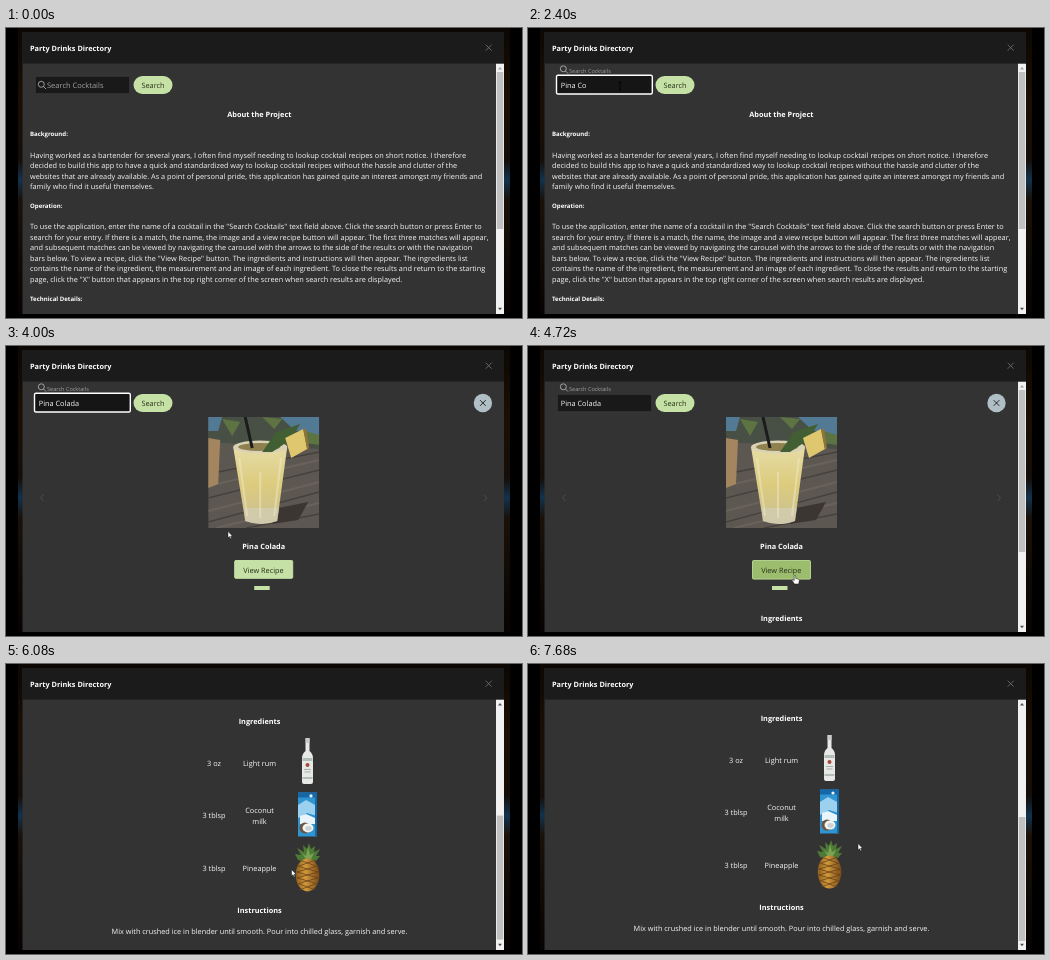
An HTML page that plays this animation: 516x290 px, repeating every 7760 ms.

```html
<!DOCTYPE html>
<html lang="en">
<head>
<meta charset="utf-8">
<title>Party Drinks Directory</title>
<style>
  html, body { margin: 0; width: 100%; height: 100%; overflow: hidden; background: #000; }
  svg { display: block; }
  text { font: 7.32px "Open Sans", "Noto Sans", sans-serif; fill: #f6f6f6; text-rendering: geometricPrecision; white-space: pre; }
  .bold { font-weight: 700; fill: #fff; }
  .small { font-size: 6.06px; }
  .mid { text-anchor: middle; }
  .dark { fill: #263018; }
  .line { fill: none; stroke: #555; stroke-width: .8; }
</style>
</head>
<body>
<svg width="516" height="290" viewBox="0 0 516 290">
  <defs>
    <linearGradient id="space" x2="0" y2="1">
      <stop offset="0" stop-color="#0c0703"/>
      <stop offset=".25" stop-color="#1a0f05"/>
      <stop offset=".46" stop-color="#140d08"/>
      <stop offset=".53" stop-color="#12324c"/>
      <stop offset=".6" stop-color="#1a1109"/>
      <stop offset="1" stop-color="#060302"/>
    </linearGradient>
    <linearGradient id="drink" x2="0" y2="1">
      <stop offset="0" stop-color="#e6dca4"/>
      <stop offset=".5" stop-color="#dccb7e"/>
      <stop offset="1" stop-color="#c9bf94"/>
    </linearGradient>
    <linearGradient id="gold">
      <stop offset="0" stop-color="#8a5a1c"/>
      <stop offset=".4" stop-color="#d29a3c"/>
      <stop offset="1" stop-color="#7a4a18"/>
    </linearGradient>
    <clipPath id="body"><path d="M16 35.5H498V286H16z"/></clipPath>
    <clipPath id="frame"><path d="M198 71H309V182H198z"/></clipPath>
  </defs>

  <path fill="url(#space)" d="M12 0H504V286H12z"/>
  <path fill="#333" d="M16.5 4H498V286H16.5z"/>
  <path fill="#1b1b1b" d="M16.5 4H498V35.5H16.5z"/>
  <text class="bold" x="24" y="23">Party Drinks Directory</text>
  <path class="line" style="stroke:#777" d="M479.7 16.7l6 6m0-6l-6 6"/>

  <g clip-path="url(#body)">
    <g id="page">
      <rect id="field"/>
      <g id="icon" class="line" style="stroke:#bbb"><circle cx="35.300" cy="56.300" r="3"/><path d="M37.500 58.500l2.600 2.600"/></g>
      <text id="label" x="41" style="fill:#a2a2a2">Search Cocktails</text>
      <text id="typed" x="32.800" y="60.200"></text>
      <rect x="127.500" y="48" width="39" height="18" rx="9" fill="#c5e1a5"/>
      <text class="mid dark" x="147" y="60.200">Search</text>

      <g id="about"></g>

      <g id="results">
        <g id="close"><circle cx="468.500" cy="57" r="9.200" fill="#b0bec5"/><path d="M465.700 54.200l5.600 5.600m0-5.600l-5.600 5.600" stroke="#222"/></g>
        <path id="prev" class="line" d="M37.500 148.500l-3 3.300l3 3.300"/>
        <path id="next" class="line" d="M469.500 148.500l3 3.300l-3 3.300"/>
        <g id="column">
          <g id="photo" clip-path="url(#frame)">
            <path fill="#5d5752" d="M198 71H309V182H198z"/>
            <path fill="#485046" d="M198 71H309V103L198 96z"/>
            <path fill="#527a94" d="M270 71H309V90L284 84zM198 71h14l-4 14h-10z"/>
            <path fill="#5d7442" d="M212 73l18 3-8 14zM252 71l20 2-8 10zM292 84l17 5v10l-14-2z"/>
            <path stroke="#45403c" stroke-width="1.300" d="M198 128L309 106M198 152L309 124M198 176L309 146M236 182L309 168"/>
            <path stroke="#69625c" stroke-width="2" d="M198 140L309 114M198 165L309 136M206 182L309 157"/>
            <path fill="#a3865f" d="M198 92l12 2-2 44-10 4z"/>
            <path fill="#3b3632" d="M268 162l30-6-10 18-26 4z"/>
            <path fill="url(#drink)" d="M223 101h54l-10 74q-16 6-32 0z"/>
            <path fill="#d6d2c2" opacity=".55" d="M234 162h35l-2 13q-16 6-32 0z"/>
            <path stroke="#f3edd0" opacity=".45" stroke-width="2" d="M229 112l8 58M271 112l-7 58M250 126v46"/>
            <ellipse cx="250" cy="101" rx="27" ry="6.500" fill="#d9d2b4"/>
            <ellipse cx="249" cy="101" rx="21" ry="4" fill="#8f8050"/>
            <path fill="#425f34" d="M252 106l14-20 24-8-10 16-18 12z"/>
            <path fill="#dfc76f" d="M275 92l18-9 4 20-16 9z"/>
            <path fill="#8f7438" d="M293 83l3 0 3 19-2 2z"/>
            <path stroke="#1b1b1b" stroke-width="3" d="M235 71l7 31"/>
          </g>
          <g id="details">
            <text class="mid bold" x="253.500" y="203.100">Pina Colada</text>
            <rect id="view" x="224.500" width="58" rx="1"/>
            <text class="mid dark" x="253.300" y="227">View Recipe</text>
            <path fill="#c5e1a5" d="M244 240h15.500v4H244z"/>
          </g>
        </g>
        <g id="recipe">
          <g id="bottle">
            <path fill="#c9ccca" d="M299.300 289h4.500v5h-4.500z"/>
            <path fill="#e6e9e6" d="M299.500 294h4v8q3.500 3 3.500 7v24q0 2-2 2h-7q-2 0-2-2v-24q0-4 3.500-7z"/>
            <path fill="#b3bdb7" d="M296.500 309h10v3h-10zM296.500 328h10v2h-10z"/>
            <circle cx="301.500" cy="316" r="2" fill="#a8473c"/>
            <path stroke="#8c928e" stroke-width=".7" d="M298 320.500h7M298.500 323h6"/>
          </g>
          <g id="carton">
            <path fill="#2f94d0" d="M292 343.500h19v44h-19z"/>
            <path fill="#9bd0ee" d="M292 356l8-5 11 6v10l-10-3-9 5z"/>
            <path fill="#1667a7" d="M292 343.500h19v5h-19zM309 348h2v39h-2z"/>
            <circle cx="305" cy="347" r="1.600" fill="#e9f3f8"/>
            <path fill="#eaf5fb" d="M294 367l6-2 9 4v6h-15z"/>
            <circle cx="299" cy="379" r="5.500" fill="#6b5444"/>
            <ellipse cx="302" cy="379" rx="5.500" ry="4.500" fill="#f5f5f0"/>
            <ellipse cx="302.500" cy="379.500" rx="3.200" ry="2.400" fill="#c9d3d6"/>
          </g>
          <g id="pineapple">
            <path fill="#4d7a35" d="M301 414l-9-3-3-6 6 1-4-7 7 4-1-7 4 4 2-6 2 6 4-3-1 6 6-3-4 7 4 0-4 5z"/>
            <path fill="#7ba354" d="M301 412l-5-8 4 3 2-9 2 8 4-2-4 8z"/>
            <ellipse cx="301.500" cy="426" rx="11.800" ry="16.500" fill="url(#gold)"/>
            <path id="hatch" fill="none" stroke="#6a4217" stroke-width=".8"/>
          </g>
        </g>
      </g>
    </g>
    <g id="scrollbar">
      <path fill="#f1f1f1" d="M490 35.500h8V286h-8z"/>
      <path id="up" d="M492 41.500l2-2.500 2 2.500z"/>
      <path fill="#505050" d="M492 279.800h4l-2 2.500z"/>
      <rect id="thumb" x="490.800" width="6.400" fill="#c1c1c1"/>
    </g>
  </g>

  <g id="cursor">
    <path id="beam" fill="none" stroke="#000" stroke-width=".8" d="M-1.500-4h3m-1.500 0v8m-1.500 0h3"/>
    <path id="arrow" fill="#fff" stroke="#111" stroke-width=".5" d="M0 0v6.500l1.500-1.300 1 2.300 1.100-.5-1-2.200h2z"/>
    <path id="hand" fill="#fff" stroke="#111" stroke-width=".5" d="M-.8 0q.8-.8 1.500 0v3l3 .8q.7.300.6 1.200l-.6 3.500h-4.200l-2.500-3.700q.2-1 1.200-.5l1 .8z"/>
  </g>
</svg>

<script>
const LOOP = 7760, FOCUS = 800, RESULTS = 3280, IMAGE = 3360, OPEN = 4400, LOADED = 4880;
const $ = id => document.getElementById(id);
const set = (id, attrs) => { for (const k in attrs) $(id).setAttribute(k, attrs[k]); };
const show = (id, on) => { $(id).style.display = on ? '' : 'none'; };
const move = (id, x, y) => set(id, { transform: `translate(${x} ${y})` });

function write(parent, x, y, string, cls = '') {
  const node = document.createElementNS('http://www.w3.org/2000/svg', 'text');
  node.setAttribute('x', x);
  node.setAttribute('y', y);
  node.setAttribute('class', cls);
  node.textContent = string;
  $(parent).append(node);
}
const paragraph = (y, lines) => lines.forEach((line, i) => write('about', 24, y + i * 10.45, line));

write('about', 253.3, 89.2, 'About the Project', 'bold mid');
write('about', 24, 108.2, 'Background:', 'bold small');
paragraph(129.6, [
  'Having worked as a bartender for several years, I often find myself needing to lookup cocktail recipes on short notice. I therefore',
  'decided to build this app to have a quick and standardized way to lookup cocktail recipes without the hassle and clutter of the',
  'websites that are already available. As a point of personal pride, this application has gained quite an interest amongst my friends and',
  'family who find it useful themselves.'
]);
write('about', 24, 180.2, 'Operation:', 'bold small');
paragraph(201.4, [
  'To use the application, enter the name of a cocktail in the "Search Cocktails" text field above. Click the search button or press Enter to',
  'search for your entry. If there is a match, the name, the image and a view recipe button will appear. The first three matches will appear,',
  'and subsequent matches can be viewed by navigating the carousel with the arrows to the side of the results or with the navigation',
  'bars below. To view a recipe, click the "View Recipe" button. The ingredients and instructions will then appear. The ingredients list',
  'contains the name of the ingredient, the measurement and an image of each ingredient. To close the results and return to the starting',
  'page, click the "X" button that appears in the top right corner of the screen when search results are displayed.'
]);
write('about', 24, 272.6, 'Technical Details:', 'bold small');

write('recipe', 253.5, 274.7, 'Ingredients', 'bold mid');
[['3 oz', 316.6, 'Light rum'], ['3 tblsp', 369.4, 'Coconut', 'milk'], ['3 tblsp', 422.2, 'Pineapple']]
  .forEach(([amount, y, ...name]) => {
    write('recipe', 208, y, amount, 'mid');
    name.forEach((word, i) => write('recipe', 253.5, y + (i - (name.length - 1) / 2) * 10.5, word, 'mid'));
  });
write('recipe', 253.5, 464, 'Instructions', 'bold mid');
write('recipe', 253.5, 485, 'Mix with crushed ice in blender until smooth. Pour into chilled glass, garnish and serve.', 'mid');

let hatch = '';
for (let i = -2; i <= 2; i++) {
  const y = 426 + i * 6, half = 11 * Math.sqrt(1 - (i / 3) ** 2);
  hatch += `M${301.5 - half} ${y - 3}l${2 * half} 6m0-6l${-2 * half} 6`;
}
set('hatch', { d: hatch });

// Eased value between [time, value] keys
function track(t, keys) {
  let [t0, v0] = keys[0];
  for (const [t1, v1] of keys) {
    if (t < t1) {
      const p = Math.max(0, (t - t0) / (t1 - t0));
      return v0 + (v1 - v0) * p * p * (3 - 2 * p);
    }
    [t0, v0] = [t1, v1];
  }
  return v0;
}

const WORD = 'Pina Colada';
const KEY_TIMES = [1680, 1760, 1920, 2080, 2160, 2320, 2400, 2560, 2720, 2960, 3120];
const SCROLL = [[5120, 0], [5320, 53], [5500, 106], [5540, 106], [5680, 159], [5840, 212], [6020, 212], [6140, 218]];
const POINTER = [[80, 190, 292], [760, 92, 58], [3520, 92, 58], [4240, 267, 229.5],
  [4880, 267, 229.5], [5120, 285.5, 205.5], [6240, 285.5, 205.5], [6800, 330, 179.5]];
const POINTER_X = POINTER.map(([t, x]) => [t, x]);
const POINTER_Y = POINTER.map(([t, , y]) => [t, y]);

function drawForm(t) {
  const float = track(t, [[FOCUS, 0], [FOCUS + 200, 1]]);
  const focused = t >= FOCUS && t < OPEN;
  set('field', focused
    ? { x: 28.5, y: 47.3, width: 95.8, height: 18.7, rx: 1.5, fill: '#151515', stroke: '#fff', 'stroke-width': 1.4 }
    : { x: 29.3, y: 48.3, width: 94.4, height: 17.4, rx: 1, fill: '#191919', stroke: '#404040', 'stroke-width': .7 });
  move('icon', 0, -15.5 * float);
  set('label', { y: 60.2 - 15.2 * float });
  $('label').style.fontSize = 7.5 - 1.94 * float + 'px';
  $('typed').textContent = WORD.slice(0, KEY_TIMES.filter(k => k <= t).length);
}

function drawResults(t, hovering) {
  const shift = t < OPEN ? 4.2 : 0, lift = t < IMAGE ? -102.7 : 0;
  show('about', t < RESULTS);
  show('results', t >= RESULTS);
  show('photo', t >= IMAGE);
  show('recipe', t >= OPEN);
  for (const id of ['bottle', 'carton', 'pineapple']) show(id, t >= LOADED);
  move('column', shift, 0);
  move('details', 0, lift);
  move('close', 2 * shift, 0);
  move('prev', 0, lift / 2);
  move('next', 2 * shift, lift / 2);
  set('view', {
    y: 214.5, height: hovering ? 18.6 : 17.8,
    fill: hovering ? '#9dbd6e' : '#c5e1a5',
    stroke: hovering ? '#b4d08e' : t >= OPEN ? '#f4f8ee' : '#c5e1a5'
  });
}

function drawScroll(t) {
  const scroll = track(t, SCROLL);
  move('page', 0, -scroll);
  show('scrollbar', t < RESULTS || t >= OPEN);
  set('up', { fill: scroll ? '#505050' : '#a3a3a3' });
  set('thumb', { y: 44 + scroll / 2, height: t < RESULTS ? 157 : t < LOADED ? 162 : 124 });
}

function draw(t) {
  const x = track(t, POINTER_X), y = track(t, POINTER_Y);
  const typing = x < 124 && y < 67;
  const hovering = t > IMAGE && x > 224 && x < 287 && y > 214 && y < 234;
  drawForm(t);
  drawResults(t, hovering);
  drawScroll(t);
  show('cursor', t >= 80);
  move('cursor', x, y);
  show('beam', typing);
  show('hand', hovering);
  show('arrow', !typing && !hovering);
}

const start = performance.now();
function tick() {
  draw((performance.now() - start) % LOOP);
  requestAnimationFrame(tick);
}
tick();
</script>
</body>
</html>
```
